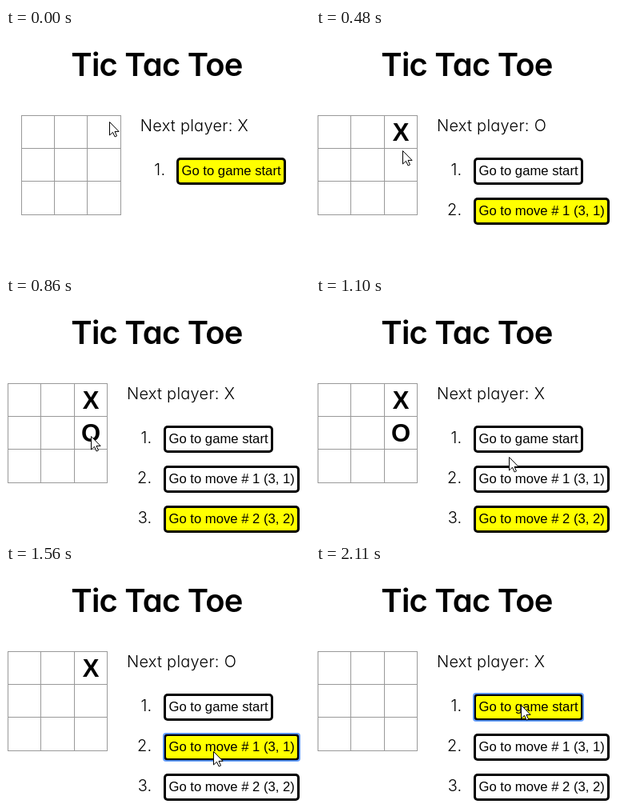
Recreate the animation shown at these times as an HTML page with a canvas. Size 380 by 300 pixels, loop 2190 ms.

```html
<!DOCTYPE html>
<html lang="en">
<head>
<meta charset="utf-8">
<title>Tic Tac Toe</title>
<style>
html, body { margin: 0; width: 100%; height: 100%; overflow: hidden; background: #fff; }
svg, canvas { position: absolute; left: 0; top: 0; width: 380px; height: 300px; }
text { font: 300 20px Inter, sans-serif; font-feature-settings: "cv11"; letter-spacing: .25px; fill: #000; }
#title { font-size: 40px; font-weight: 600; letter-spacing: -.8px; text-anchor: middle; }
.num { text-anchor: end; }
</style>
</head>
<body>
<svg viewBox="0 0 380 300">
  <text id="title" x="188.5" y="60">Tic Tac Toe</text>
  <text id="status" y="129"></text>
  <text class="num" y="184">1.</text>
  <text class="num" y="234">2.</text>
  <text class="num" y="284">3.</text>
</svg>
<canvas></canvas>
<script>
const LOOP = 2190, STEP = 80, CELL = 41.25;
const SANS = '"Liberation Sans", Arial, sans-serif';
const canvas = document.querySelector('canvas');
const ctx = canvas.getContext('2d');
const statusText = document.querySelector('#status');
const nums = document.querySelectorAll('.num');
const scale = window.devicePixelRatio || 1;
canvas.width = 380 * scale;
canvas.height = 300 * scale;

// Each click travels from one point to another; those with a jump press a history button.
const clicks = [
  { from: [129, 117], at: [129, 117], arrive: 80, press: 80, release: 250 },
  { from: [129, 129], at: [106, 175], arrive: 710, press: 710, release: 860 },
  { from: [106, 175], at: [259, 234], arrive: 1410, press: 1410, release: 1560, jump: 1 },
  { from: [259, 234], at: [256, 176], arrive: 1880, press: 2030, release: 2110, jump: 0 }
];

// Replays the clicks up to time t.
function gameAt(t) {
  const game = { move: 0, count: 1, focus: -1 };
  for (const { press, release, jump } of clicks) {
    if (t >= press && jump !== undefined) game.focus = jump;
    if (t < release) break;
    if (jump === undefined) game.count = ++game.move + 1;
    else game.move = jump;
  }
  return game;
}

// The pointer eases out along a curve bent towards the corner (x1, y0).
function pointerAt(t) {
  const i = clicks.findIndex(c => t < c.release);
  if (i < 0) return { pos: clicks[clicks.length - 1].at, pressed: false };
  const { from: [x0, y0], at: [x1, y1], arrive, press } = clicks[i];
  const begin = i ? clicks[i - 1].release : 0;
  const tick = Math.max(begin, arrive - STEP * Math.ceil((arrive - t) / STEP));
  const k = Math.min(1, (tick - begin) / (arrive - begin));
  const s = 1 - (1 - k) ** 2;
  const x = x1 + (x0 - x1) * (1 - s) ** 2;
  const y = y0 + (y1 - y0) * s ** 2;
  return { pos: [Math.round(x), Math.round(y)], pressed: t >= press };
}

function fillBox(x, y, w, h, r, color) {
  ctx.fillStyle = color;
  ctx.beginPath();
  ctx.roundRect(x, y, w, h, r);
  ctx.fill();
}

function drawBoard(left, move) {
  const top = 108.9;
  ctx.fillStyle = '#999';
  for (let i = 0; i < 4; i++) {
    ctx.fillRect(Math.round(left + CELL * i), 109, 1, 125);
    ctx.fillRect(Math.round(left), Math.round(top + CELL * i), 125, 1);
  }
  ctx.fillStyle = '#000';
  ctx.font = 'bold 31px ' + SANS;
  ctx.textAlign = 'center';
  for (let i = 0; i < move; i++) ctx.fillText('XO'[i], 106, 141 + 41 * i);
}

function drawButton(i, left, active, focused) {
  const label = i ? `Go to move # ${i} (3, ${i})` : 'Go to game start';
  ctx.font = '16.67px ' + SANS;
  ctx.textAlign = 'left';
  const x = Math.round(left), y = 162 + 50 * i;
  const w = Math.round(left + ctx.measureText(label).width + 12.9) - x;
  fillBox(x, y, w, 34, 5, '#000');
  fillBox(x + 3, y + 3, w - 6, 28, 2, active ? '#ff0' : '#fff');
  if (focused) {
    ctx.strokeStyle = 'rgba(77,144,254,.85)';
    ctx.lineWidth = 2;
    ctx.beginPath();
    ctx.roundRect(x, y, w, 34, 3);
    ctx.stroke();
  }
  ctx.fillStyle = '#000';
  ctx.fillText(label, x + 6.5, y + 22);
}

function drawPointer({ pos: [x, y], pressed }) {
  const arrow = [[0, 0], [0, 16.5], [4, 12.8], [6.6, 18.5], [9, 17.4], [6.5, 11.9], [11.6, 11.9]];
  ctx.beginPath();
  for (const [dx, dy] of arrow) ctx.lineTo(x + dx + 0.5, y + dy + 0.5);
  ctx.closePath();
  ctx.fillStyle = '#fff';
  ctx.fill();
  ctx.strokeStyle = '#000';
  ctx.lineWidth = 1;
  ctx.stroke();
  if (pressed) fillBox(x - 15, y - 15, 30, 30, 15, 'rgba(255,250,50,.6)');
}

function render(t) {
  const { move, count, focus } = gameAt(t);
  // The centred layout moves left once the wider buttons appear.
  const shift = count > 1 ? 0 : 16.8;

  statusText.textContent = 'Next player: ' + 'XO'[move % 2];
  statusText.setAttribute('x', 151 + shift);
  nums.forEach((num, i) => {
    num.setAttribute('x', 182.5 + shift);
    num.style.display = i < count ? '' : 'none';
  });

  ctx.setTransform(scale, 0, 0, scale, 0, 0);
  ctx.clearRect(0, 0, 380, 300);
  drawBoard(2.1 + shift, move);
  for (let i = 0; i < count; i++) drawButton(i, 196.6 + shift, i === move, i === focus);
  drawPointer(pointerAt(t));
}

const start = performance.now();
function loop() {
  render((performance.now() - start) % LOOP);
  requestAnimationFrame(loop);
}
loop();
</script>
</body>
</html>
```
